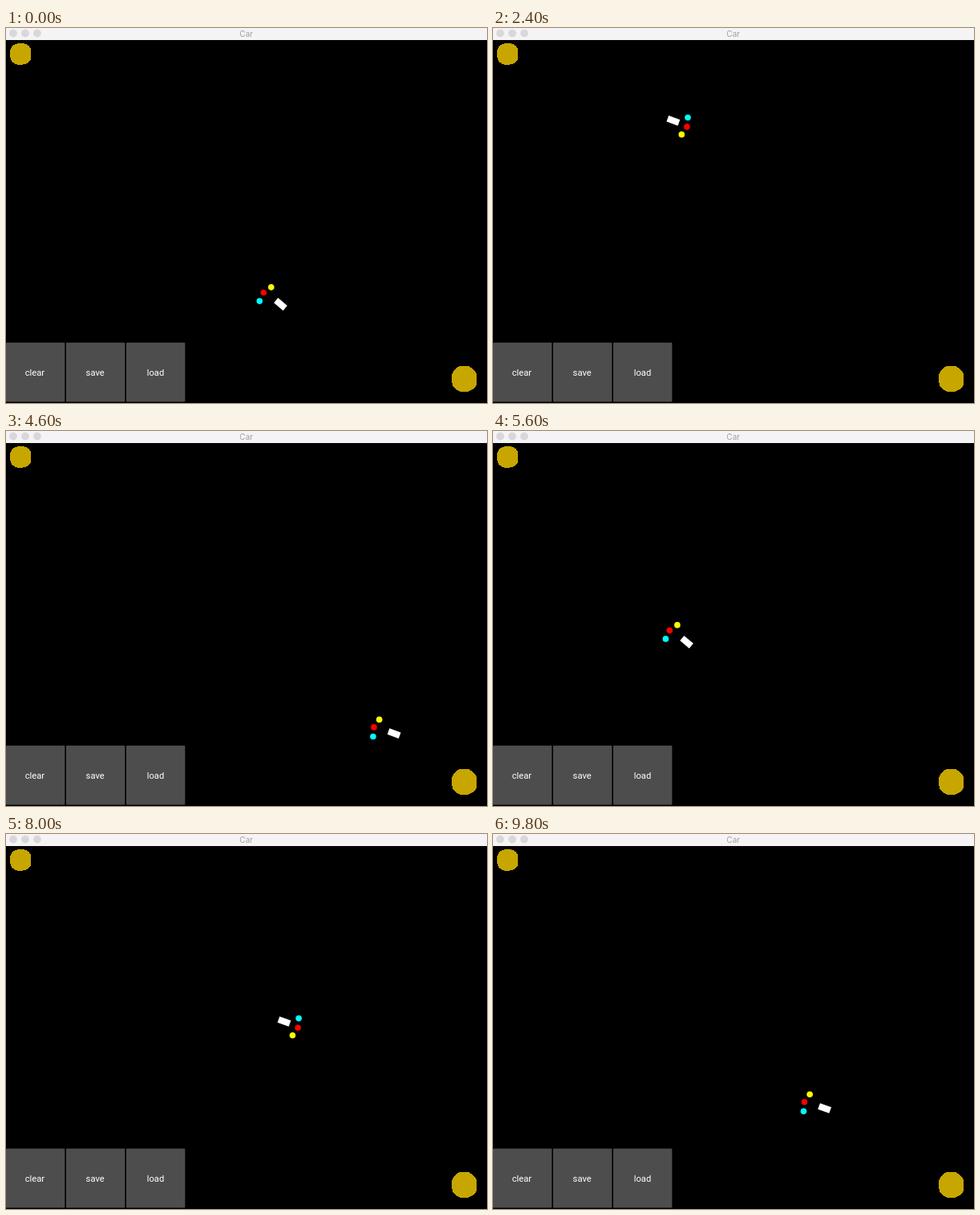
Animation, 600 px wide and 467 px high, one loop 9900 ms. Source, as an HTML page:

```html
<!DOCTYPE html>
<html lang="en">
<head>
<meta charset="utf-8">
<title>Car</title>
<style>
  html, body { margin: 0; width: 100%; height: 100%; overflow: hidden; background: #000; }
  svg { display: block; width: 600px; height: 467px; }
  text { text-anchor: middle; }
  .title { font: 10px Inter, sans-serif; fill: #a3a1a4; }
  .label { font: 11.25px Roboto, sans-serif; fill: #fff; }
</style>
</head>
<body>
<svg viewBox="0 0 600 467">
  <rect width="600" height="467"/>
  <g fill="#c7a600" shape-rendering="crispEdges">
    <path d="M18 19 C26 18.5 31.4 23 31.4 29 V36 C31.4 42 26 45 19 46 C11 46.5 5 42 5 35 V30 C5 23 10 19 18 19Z"/>
    <path d="M566 421 H577 C583 424 587.4 429 587.4 433 V442 C587 448 580 453.5 571 453.5 C562 453 556 447 556 440 V434 C556 428 561 423 566 421Z"/>
  </g>
  <g id="buttons"></g>
  <rect id="car" x="-7.5" y="-4" width="15" height="8" fill="#fff"/>
  <g id="sensors">
    <circle r="3.8" fill="#f00"/>
    <circle r="3.8" fill="#0ff"/>
    <circle r="3.8" fill="#ff0"/>
  </g>
  <rect width="600" height="15" fill="#f5f3f6"/>
  <g id="lights" fill="#d9d7da"></g>
  <text class="title" x="299.7" y="10.6">Car</text>
</svg>
<script>
const LOOP = 9900, STEP = 100;
const SPEED = 0.271; // px per ms
const REACH = 22.5, SPREAD = 30, NOSE = 4;
const SENSOR_TURNS = [0, -SPREAD, SPREAD];
const RAD = Math.PI / 180;

// The car drives at constant speed: straight, except for these bends.
const start = { x: 338.5, y: 344, heading: 220 };
const bends = [
  { at: 1514, lasts: 182, turn: 160 },
  { at: 3420, lasts: 26, turn: 40 },
  { at: 4128, lasts: 182, turn: 140 },
  { at: 5332, lasts: 18, turn: 20 },
  { at: 6585, lasts: 15, turn: -60 },
  { at: 6627, lasts: 114, turn: -140 },
  { at: 8775, lasts: 22, turn: 40 },
  { at: 9055, lasts: 162, turn: 140 }
];

const cos = a => Math.cos(a * RAD);
const sin = a => Math.sin(a * RAD);

function straight({ x, y, heading }, ms) {
  const run = ms * SPEED;
  return { x: x + run * cos(heading), y: y + run * sin(heading), heading };
}

function arc({ x, y, heading }, { lasts, turn }, ms) {
  const next = heading + turn * ms / lasts;
  const radius = lasts * SPEED / (turn * RAD);
  return {
    x: x + radius * (sin(next) - sin(heading)),
    y: y + radius * (cos(heading) - cos(next)),
    heading: next
  };
}

function poseAt(time) {
  let pose = start, clock = 0;
  for (const bend of bends) {
    if (bend.at >= time) break;
    const ms = Math.min(bend.lasts, time - bend.at);
    pose = arc(straight(pose, bend.at - clock), bend, ms);
    clock = bend.at + ms;
  }
  return straight(pose, time - clock);
}

document.getElementById("buttons").innerHTML = ["clear", "save", "load"].map((name, i) =>
  `<rect x="${i * 75}" y="391.7" width="73.4" height="73.8" rx="1" fill="#4d4d4d"/>
   <text class="label" x="${35.9 + i * 75.3}" y="433">${name}</text>`).join("");

document.getElementById("lights").innerHTML = [0, 1, 2].map(i =>
  `<circle cx="${9 + i * 15}" cy="6.6" r="4.9"/>`).join("");

const car = document.getElementById("car");
const sensors = [...document.getElementById("sensors").children];

function draw(time) {
  const { x, y, heading } = poseAt(time);
  car.setAttribute("transform", `translate(${x + NOSE} ${y}) rotate(${heading})`);
  sensors.forEach((dot, i) => {
    const angle = heading + SENSOR_TURNS[i];
    dot.setAttribute("cx", x + REACH * cos(angle));
    dot.setAttribute("cy", y + REACH * sin(angle));
  });
}

let origin;
function tick(now) {
  origin ??= now;
  const time = Math.max(0, now - origin) % LOOP;
  draw(Math.floor(time / STEP) * STEP);
  requestAnimationFrame(tick);
}
draw(0);
requestAnimationFrame(tick);
</script>
</body>
</html>
```
